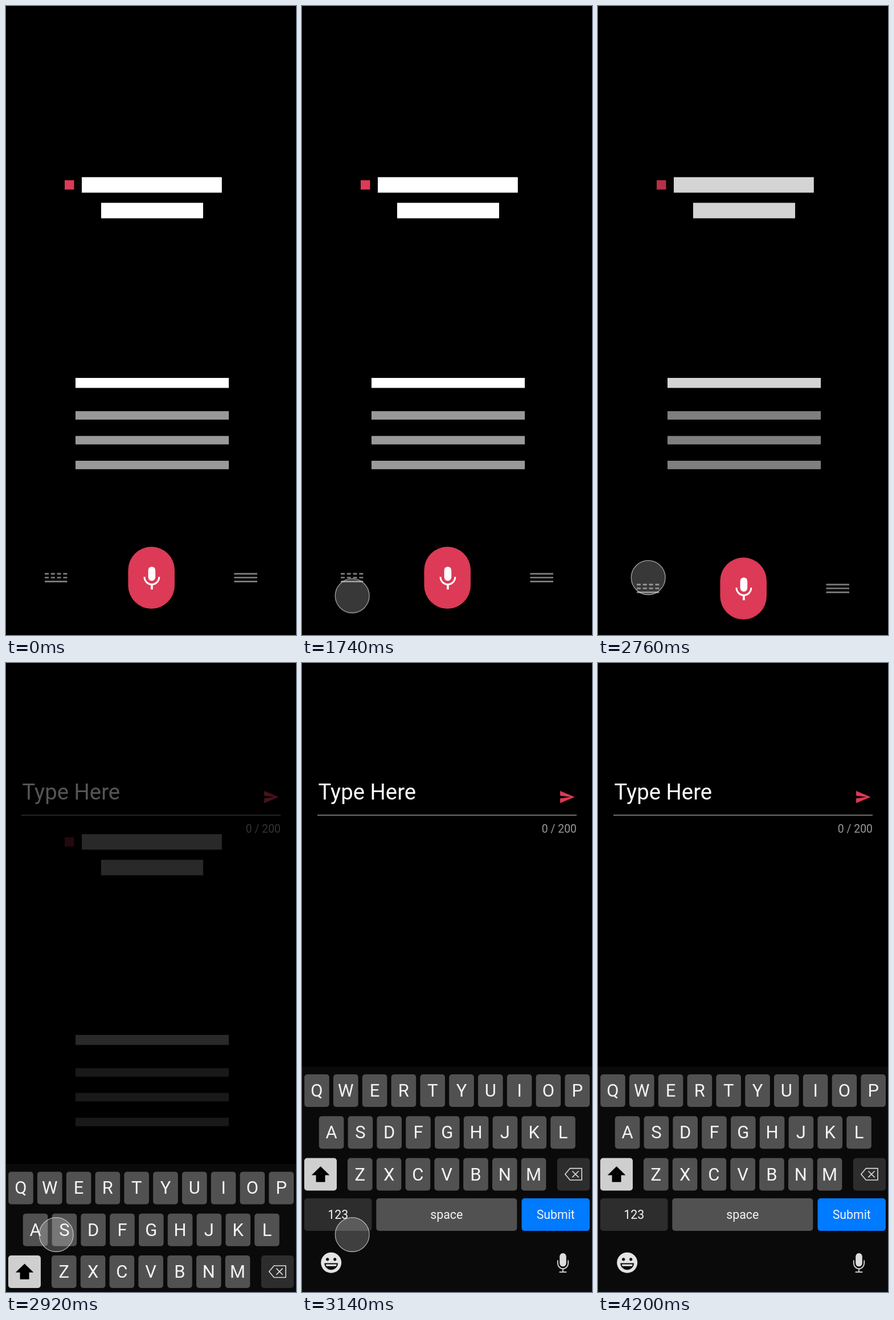
Animation, 509 px wide and 1101 px high, one loop 6.12 s. Source, as an HTML page:

```html
<!DOCTYPE html>
<html lang="en">
<head>
<meta charset="utf-8">
<title>Voice to keyboard</title>
<style>
  html, body { margin: 0; width: 100%; height: 100%; overflow: hidden; background: #000; }
  svg { display: block; width: 100%; height: 100%; font-family: Roboto, sans-serif; }
  .red { fill: #dc3a56; }
  .white { fill: #fff; }
  .grey { fill: #999; }
  .key { fill: #515151; }
  .dark { fill: #2d2d2d; }
  .blue { fill: #007aff; }
  .light { fill: #cfcfcf; }
  .label { fill: #f4f4f4; text-anchor: middle; }
</style>
</head>
<body>
<svg viewBox="0 0 509 1101">
  <rect width="509" height="1101"/>

  <g id="intro">
    <rect class="red" x="103" y="305" width="16.5" height="16.3"/>
    <g class="white">
      <rect x="133" y="299.6" width="245.8" height="27.1"/>
      <rect x="167" y="344.5" width="179" height="27.1"/>
      <rect x="122" y="651" width="269" height="17.5"/>
    </g>
    <g class="grey">
      <rect x="122" y="709.2" width="269" height="14.8"/>
      <rect x="122" y="752.6" width="269" height="14.8"/>
      <rect x="122" y="796" width="269" height="14.8"/>
    </g>
  </g>

  <g id="bar">
    <g stroke="#808080" stroke-width="2.7">
      <path d="M68 993.9H107.4M68 1000.5H107.4" stroke-dasharray="7 3.8"/>
      <path d="M68 1007.3H107.4M400.4 993.9H441M400.4 1000.5H441M400.4 1007.3H441"/>
    </g>
    <rect class="red" x="214.4" y="946.6" width="81.6" height="108.4" rx="40.8"/>
    <rect class="white" x="249.6" y="981.4" width="12.6" height="24.8" rx="6.3"/>
    <path d="M243 999.2a12.9 13.4 0 0 0 25.8 0" fill="none" stroke="#fff" stroke-width="3"/>
    <rect class="white" x="254" y="1012.5" width="3.8" height="8.7"/>
  </g>

  <g id="form">
    <text class="white" x="28.6" y="239" font-size="38.3">Type Here</text>
    <path class="red" transform="translate(450.6 220.2) scale(1.22 1.2)" d="M2 21 23 12 2 3v7l15 2-15 2z"/>
    <path d="M27 266.4H482" stroke="#aaa" stroke-width="1.3"/>
    <text class="grey" x="482" y="297" font-size="19.4" text-anchor="end">0 / 200</text>
  </g>

  <g id="board">
    <rect y="706.5" width="509" height="395" fill="#0a0a0a"/>
    <g id="keys"></g>
    <path d="M32.6 881 48.4 896.4H40.6V908.4H24.6V896.4H16.8Z"/>
    <path d="M461.8 894.8 470.4 884.6H491V905H470.4ZM474.4 889.2 485.6 900.4M485.6 889.2 474.4 900.4"
          fill="none" stroke="#ddd" stroke-width="1.6" stroke-linejoin="round"/>
    <circle cx="51.2" cy="1049.7" r="18" fill="#e4e4e4"/>
    <g fill="#0a0a0a">
      <circle cx="44.7" cy="1043.8" r="2.6"/>
      <circle cx="57.7" cy="1043.8" r="2.6"/>
      <path d="M39.4 1050.6H63a11.8 11.6 0 0 1-23.6 0Z"/>
    </g>
    <path d="M41.6 1052.4H60.8L59.6 1055.8H42.8Z" fill="#e4e4e4"/>
    <rect x="452.2" y="1033" width="11.6" height="23.4" rx="5.8" fill="#ddd"/>
    <path d="M448.8 1045.5V1050.5a9.2 9.8 0 0 0 18.4 0V1045.5M458 1060V1066M451.6 1066.2H464.4"
          fill="none" stroke="#ddd" stroke-width="1.8"/>
  </g>

  <circle id="touch" cx="88.2" cy="1000.6" r="29.9" fill="#fff" fill-opacity=".22"
          stroke="#fff" stroke-opacity=".6" stroke-width="1.3"/>
</svg>
<script>
  const LOOP = 6120;
  const byId = id => document.getElementById(id);

  // Keyboard
  const keys = byId('keys');
  const add = (tag, attrs, text = '') => {
    const el = document.createElementNS(keys.namespaceURI, tag);
    for (const k in attrs) el.setAttribute(k, attrs[k]);
    el.textContent = text;
    keys.append(el);
  };
  const key = (x, y, w, cls, text, size = 21.3) => {
    add('rect', { x, y, width: w, height: 57, rx: 5, class: cls });
    if (text) add('text', { x: x + w / 2, y: y + 28 + size * .355, 'font-size': size, class: 'label' }, text);
  };
  const row = (letters, x, y) =>
    [...letters].forEach((c, i) => key(x + i * 50.8, y, 43.6, 'key', c, 31));

  row('QWERTYUIOP', 4.2, 720);
  row('ASDFGHJKL', 29.8, 793.3);
  row('ZXCVBNM', 80, 866.5);
  key(4, 866.5, 57, 'light');
  key(448, 866.5, 57, 'dark');
  key(4, 937, 118.4, 'dark', '123');
  key(130.3, 937, 247, 'key', 'space');
  key(385.5, 937, 119.5, 'blue', 'Submit');

  // Each step: [time in ms, value, easing towards the next step]
  const play = (id, prop, steps) => {
    const all = [[0, steps[0][1]], ...steps, [LOOP, steps[steps.length - 1][1]]];
    byId(id).animate(
      all.map(([t, value, easing = 'linear']) => ({
        offset: t / LOOP, easing,
        [prop]: prop === 'transform' ? `translateY(${value}px)` : value
      })),
      { duration: LOOP, iterations: Infinity });
  };
  const CUBIC = 'cubic-bezier(.65,0,.35,1)';
  const RISE = 'cubic-bezier(.25,0,.4,1)';

  play('intro', 'opacity', [[2580, 1, CUBIC], [3100, 0]]);
  play('bar', 'transform', [[2580, 0, CUBIC], [3100, 112]]);
  play('form', 'opacity', [[2810, 0], [3140, 1]]);
  play('board', 'transform', [[2790, 395], [2790, 395, RISE], [3110, 0]]);
  play('touch', 'transform', [[1355, 95, 'ease-out'], [2155, 0], [3860, 0, 'cubic-bezier(.3,.1,.8,.8)'], [4195, 134]]);
  play('touch', 'opacity', [[1355, 0], [1355, 1], [4195, 1], [4195, 0]]);
</script>
</body>
</html>
```
